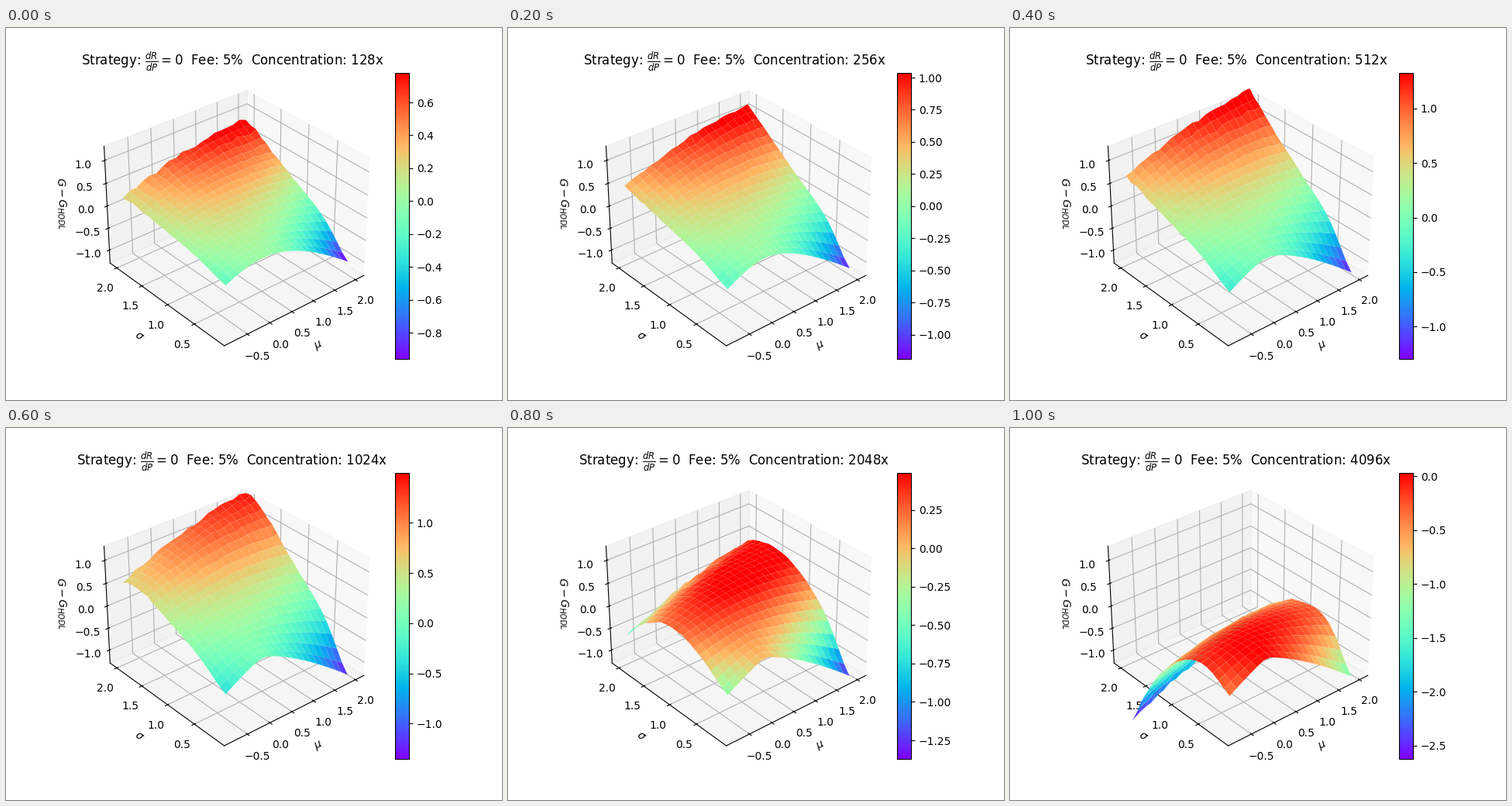
A matplotlib script that plays this animation: 640 px wide and 480 px high, repeating every 1200 ms.

```python
import numpy as np
import matplotlib.pyplot as plt
from matplotlib.animation import FuncAnimation

MU_RANGE, SIGMA_RANGE, GAIN_RANGE = (-0.8, 2.0), (0.1, 2.0), (-1.25, 1.25)
MU, SIGMA = np.meshgrid(np.linspace(*MU_RANGE, 20), np.linspace(*SIGMA_RANGE, 20))

# Color range for each doubling of the concentration
COLOR_LIMITS = [(-0.961, 0.781), (-1.191, 1.039), (-1.300, 1.330),
                (-1.353, 1.499), (-1.372, 0.492), (-2.624, 0.032)]


def holding_gain(drift, sigma):
    """Expected log gain of holding both assets, beyond half the drift."""
    nodes, weights = np.polynomial.hermite_e.hermegauss(24)
    log_price = drift[..., None] + sigma[..., None] * nodes
    return np.log(np.cosh(log_price / 2)) @ weights / weights.sum()


def gain(doubling):
    drift = MU - SIGMA**2 / 2
    width = 0.5**doubling
    out_of_range = (np.hypot(drift, width) - width) / 2 * np.exp(-(SIGMA / 0.4)**2)

    fees = (0.37 + 0.09 * min(doubling, 3)) * SIGMA**1.7
    trend = 0.008 * (1 + doubling) * (MU - 1.3) * SIGMA**2
    overtrading = 1.05 * np.maximum(0, SIGMA - 3.25 + 0.61 * doubling)**2

    rng = np.random.default_rng(20 + doubling)
    noise = 0.005 * SIGMA**2 * rng.standard_normal(MU.shape)
    return fees + trend + noise - overtrading - out_of_range - holding_gain(drift, SIGMA)


def padded(low, high, margin):
    pad = margin * (high - low)
    return low - pad, high + pad


def update(doubling):
    fig.clear()
    ax = fig.add_subplot(projection="3d")
    surface = ax.plot_surface(MU, SIGMA, gain(doubling), cmap="rainbow", linewidth=0)
    surface.set_clim(*COLOR_LIMITS[doubling])

    ax.set_xticks(np.arange(-0.5, 2.1, 0.5))
    ax.set_yticks(np.arange(0.5, 2.1, 0.5))
    ax.set_zticks(np.arange(-1, 1.1, 0.5))
    margin = (1.1 * 25 / 24 - 1) / 2
    ax.set_xlim(*padded(*MU_RANGE, margin))
    ax.set_ylim(*padded(*SIGMA_RANGE, margin))
    ax.set_zlim(*padded(*GAIN_RANGE, 1 / 48))
    ax.view_init(elev=32, azim=-130)

    ax.set_xlabel(r"$\mu$")
    ax.set_ylabel(r"$\sigma$")
    ax.set_zlabel(r"$G-G_{HODL}$")
    ax.set_title(r"Strategy: $\frac{dR}{dP}=0$  Fee: 5%  "
                 f"Concentration: {128 * 2**doubling}x")
    fig.colorbar(surface, ax=ax)
    return []


fig = plt.figure(figsize=(6.4, 4.8), dpi=100)
anim = FuncAnimation(fig, update, frames=len(COLOR_LIMITS), init_func=lambda: [],
                     interval=200, repeat=True, repeat_delay=0)
plt.show()
```
